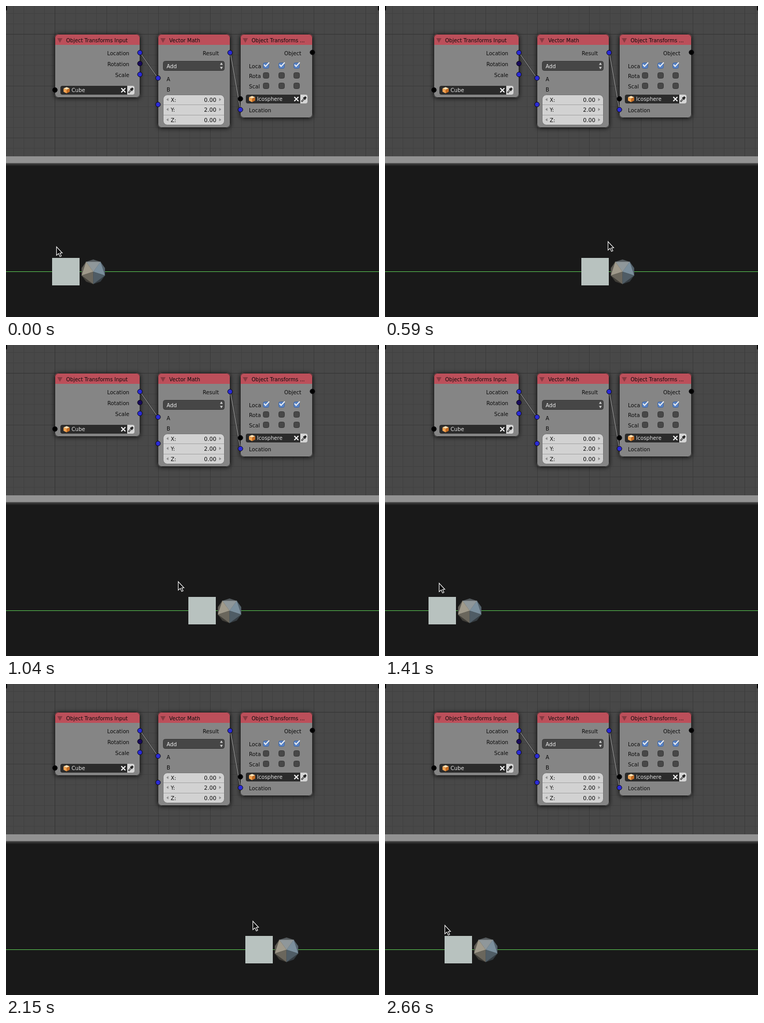
Animation of 720x600 px, one loop 2700 ms. Source, as an HTML page with a canvas:

```html
<!DOCTYPE html>
<html lang="en">
<head>
<meta charset="utf-8">
<title>Node transforms</title>
<style>
html, body { margin: 0; width: 720px; height: 600px; overflow: hidden; background: #191919; }
canvas { display: block; }
</style>
</head>
<body>
<canvas id="stage" width="720" height="600"></canvas>
<script>
const LOOP = 2700;
const stage = document.getElementById('stage').getContext('2d');
const backdrop = document.createElement('canvas');
backdrop.width = 720;
backdrop.height = 600;
let g = backdrop.getContext('2d');

function rect(x, y, w, h, color) {
  g.fillStyle = color;
  g.fillRect(x, y, w, h);
}

function poly(points, fill, stroke, width = 1) {
  g.beginPath();
  points.forEach(([x, y]) => g.lineTo(x, y));
  g.closePath();
  g.fillStyle = fill;
  g.fill();
  if (stroke) { g.strokeStyle = stroke; g.lineWidth = width; g.stroke(); }
}

function line(points, color, width = 1) {
  g.beginPath();
  points.forEach(([x, y]) => g.lineTo(x, y));
  g.strokeStyle = color;
  g.lineWidth = width;
  g.stroke();
}

function box(x, y, w, h, radius, fill, stroke) {
  g.beginPath();
  g.roundRect(x, y, w, h, radius);
  if (fill) { g.fillStyle = fill; g.fill(); }
  if (stroke) { g.strokeStyle = stroke; g.lineWidth = 1; g.stroke(); }
}

function label(text, x, cy, color = '#0c0c0c', align = 'left', size = 10.15) {
  g.font = size + 'px "DejaVu Sans", sans-serif';
  g.textAlign = align;
  g.fillStyle = color;
  g.fillText(text, x, Math.floor(cy) + 4);
}

function socket(x, y, color) {
  g.beginPath();
  g.arc(x, y, 4.6, 0, 7);
  g.fillStyle = color;
  g.fill();
  g.strokeStyle = '#08080c';
  g.lineWidth = 1;
  g.stroke();
}

function node(x, y, w, h, title) {
  g.save();
  g.shadowColor = 'rgba(0,0,0,.8)';
  g.shadowBlur = 8;
  g.shadowOffsetY = 1;
  box(x, y, w, h, 7, '#858585');
  g.restore();
  box(x, y, w, 21, [7, 7, 0, 0], '#bc4f5a');
  box(x + .5, y + .5, w - 1, h - 1, 7, null, '#242424');
  poly([[x + 5, y + 8], [x + 15, y + 8], [x + 10, y + 17]], '#873a42');
  label(title, x + 22, y + 12, '#0c0c0c', 'left', 9.95);
}

function cubeIcon(x, y) {
  const side = dx => [[x, y - 1], [x + dx, y - 3.5], [x + dx, y + 3], [x, y + 6]];
  poly([[x, y - 6], [x + 6, y - 3.5], [x, y - 1], [x - 6, y - 3.5]], '#ffe2b4');
  poly(side(-6), '#f2a553');
  poly(side(6), '#c66c22');
}

function dropper(x, y) {
  line([[x - 4.5, y + 5], [x + 2, y - 2]], '#333', 3);
  line([[x - 3.5, y + 4], [x + 1, y - 1]], '#e8e8e8');
  line([[x - 1, y - 3], [x + 3, y + 1]], '#222', 2);
  line([[x + 1, y - 1], [x + 4, y - 4]], '#222', 4);
}

function objectField(x, y, right, name) {
  const cx = right - 7.5, cy = y + 8.5;
  box(right, y, 14, 17, [0, 4, 4, 0], '#d6d6d6');
  box(x, y, right - x, 17, [4, 0, 0, 4], '#2b2b2b');
  cubeIcon(x + 12, cy);
  label(name, x + 21.5, cy, '#e2e2e2');
  for (const s of [-1, 1]) line([[cx - 4, cy - 4 * s], [cx + 4, cy + 4 * s]], '#fff', 2);
  dropper(right + 7, cy);
}

function checkbox(cx, cy, on) {
  box(cx - 5.5, cy - 5.5, 11, 11, 3, on ? '#5681c4' : '#484848', on ? '#44669c' : '#363636');
  if (on) line([[cx - 4, cy - 2], [cx - 1, cy + 1.5], [cx + 6, cy - 6]], '#f0f0f0', 2);
}

function sideArrow(x, y, dir) {
  poly([[x + 2 * dir, y], [x - 2 * dir, y - 3], [x - 2 * dir, y + 3]], '#8b8b8b');
}

function link(a, b) {
  line([a, b], 'rgba(30,30,30,.55)', 2.4);
  line([a, b], '#b0b0b0');
}

function drawGrid(ox, oy, step) {
  rect(0, 0, 720, 290, '#484848');
  for (const pass of [1, 5]) {
    const color = pass === 1 ? '#414141' : '#3a3a3a';
    const gap = step * pass;
    for (let x = ox % gap; x < 720; x += gap) rect(x, 0, 1, 290, color);
    for (let y = oy % gap; y < 290; y += gap) rect(0, y, 720, 1, color);
  }
  rect(ox, 0, 1, 290, '#333');
  rect(0, oy, 720, 1, '#333');
}

function drawBackdrop() {
  const blue = '#2a2ad6', black = '#000', ink = '#0c0c0c';
  rect(0, 0, 720, 600, '#191919');
  drawGrid(94, 54, 20);
  for (const x of [-3, 718]) box(x, -2, 5, 11, 3, black);
  rect(0, 290, 720, 13, '#929292');
  rect(0, 303, 720, 3, '#464646');
  rect(0, 306, 720, 1, '#101010');
  rect(0, 307, 720, 1, '#383838');
  rect(0, 512, 720, 1, '#5fd057');

  node(94, 54, 165, 123, 'Object Transforms Input');
  node(293, 54, 140, 181, 'Vector Math');
  node(452, 54, 140, 162, 'Object Transforms ...');
  link([259, 90], [293, 139]);
  link([433, 90], [452.5, 200]);

  ['Location', 'Rotation', 'Scale'].forEach((text, i) => {
    label(text, 238, 91 + i * 21, ink, 'right');
    socket(258.5, 90 + i * 21, i === 1 ? '#180a5c' : blue);
  });
  objectField(105, 154, 234, 'Cube');
  socket(94.5, 162, black);

  label('Result', 411, 91, ink, 'right');
  box(303.5, 106.5, 118, 18, 4, '#464646', '#383838');
  label('Add', 310, 116, '#eee');
  for (const s of [-1, 1]) {
    poly([[413, 115.5 + s * 2], [418.5, 115.5 + s * 2], [415.8, 115.5 + s * 6.5]], '#d0d0d0');
  }
  label('A', 310, 141);
  label('B', 310, 161);
  box(303.5, 171.5, 118, 58, 8, '#d2d2d2', '#747474');
  ['0.00', '2.00', '0.00'].forEach((value, i) => {
    const y = Math.floor(181 + i * 19.5);
    if (i) rect(304, y - 10, 117, 1, '#a2a2a2');
    label('XYZ'[i] + ':', 318, y);
    label(value, 406, y, ink, 'right', 10.7);
    for (const s of [-1, 1]) sideArrow(362.5 + s * 51, y - .5, s);
  });
  socket(432.5, 90, blue);
  socket(293.5, 139, blue);
  socket(293.5, 190, blue);

  label('Object', 570, 91, ink, 'right');
  ['Loca', 'Rota', 'Scal'].forEach((text, row) => {
    const y = Math.floor(116 + row * 19.5);
    label(text, 469, y);
    for (const x of [502, 532, 561]) checkbox(x, y - 1, row === 0);
  });
  objectField(463, 171, 568, 'Icosphere');
  label('Location', 469, 201);
  socket(591.5, 89.5, black);
  socket(452.5, 179, black);
  socket(452.5, 200, blue);
}

// Turning points and fast stretches of the drag: [step, position].
const cubeKeys = [
  [1, 75], [13, 379], [14, 415], [17, 464], [23, 352], [24, 302],
  [30.5, 82], [34, 164], [36, 260], [44.5, 463], [57, 115], [59, 75]
];
const heightKeys = [[1, 463], [15, 454], [35, 460], [45, 456.6], [57, 465], [59, 463]];
const STEPS = 58;

const bursts = [[0, 1], [50, 12], [590, 12], [1150, 10], [1680, 12], [2230, 11], [LOOP, 0]];

function stepAt(t) {
  let first = 0;
  for (let i = 0; ; i++) {
    const [start, count] = bursts[i], end = bursts[i + 1][0];
    if (t < end) {
      const raw = (t - start) / (end - start) * count;
      return first + Math.min(count - 1, Math.floor(raw + .4));
    }
    first += count;
  }
}

// Cubic through the keys, flat at turning points.
function track(keys, step) {
  const s = step < 1 ? step + STEPS : step;
  const rate = i => (keys[i + 1][1] - keys[i][1]) / (keys[i + 1][0] - keys[i][0]);
  const slope = i => {
    if (i === 0 || i === keys.length - 1) return 0;
    const a = rate(i - 1), b = rate(i);
    return a * b > 0 ? (a + b) / 2 : 0;
  };
  const i = keys.findIndex(k => k[0] > s) - 1;
  const [s0, p0] = keys[i], [s1, p1] = keys[i + 1];
  const d = s1 - s0, u = (s - s0) / d, r = 1 - u;
  return Math.round(r * r * (1 + 2 * u) * p0 + u * u * (3 - 2 * u) * p1
    + d * u * r * (r * slope(i) - u * slope(i + 1)));
}

const faces = ['#7b8f9d', '#8f979a', '#a09a8b', '#6a665c', '#4f5c65'];
const rims = ['#53616b', '#545a5d', '#5c5952', '#3e3c37', '#343b40'];

function icosphere(cx, cy) {
  const at = deg => {
    const a = deg * Math.PI / 180;
    return [cx + 23.7 * Math.cos(a), cy - 23.7 * Math.sin(a)];
  };
  for (let i = 0; i < 5; i++) {
    const a = i * 72 - 18;
    poly([at(a), at(a + 36), at(a + 72)], rims[i]);
    poly([[cx, cy], at(a), at(a + 72)], faces[i], faces[i], .3);
  }
}

function pointer(x, y) {
  const shape = [[0, 0], [0, 16.5], [4, 13], [6.7, 19], [9.3, 17.8], [6.7, 12], [11, 12]];
  poly(shape.map(([dx, dy]) => [x + .5 + dx, y + .5 + dy]), '#0a0a0a', '#f4f4f4', 1.2);
}

function draw(now) {
  const step = stepAt(now % LOOP);
  const x = track(cubeKeys, step);
  g.drawImage(backdrop, 0, 0);
  rect(x, 486, 53, 53, '#b8c2bf');
  icosphere(x + 79.5, 512.7);
  // The dragged cube trails the pointer by most of a step.
  pointer(track(cubeKeys, step + .8) + 21, track(heightKeys, step));
}

drawBackdrop();
g = stage;
let origin;
function frame(now) {
  origin ??= now;
  draw(Math.max(0, now - origin));
  requestAnimationFrame(frame);
}
draw(0);
requestAnimationFrame(frame);
</script>
</body>
</html>
```
